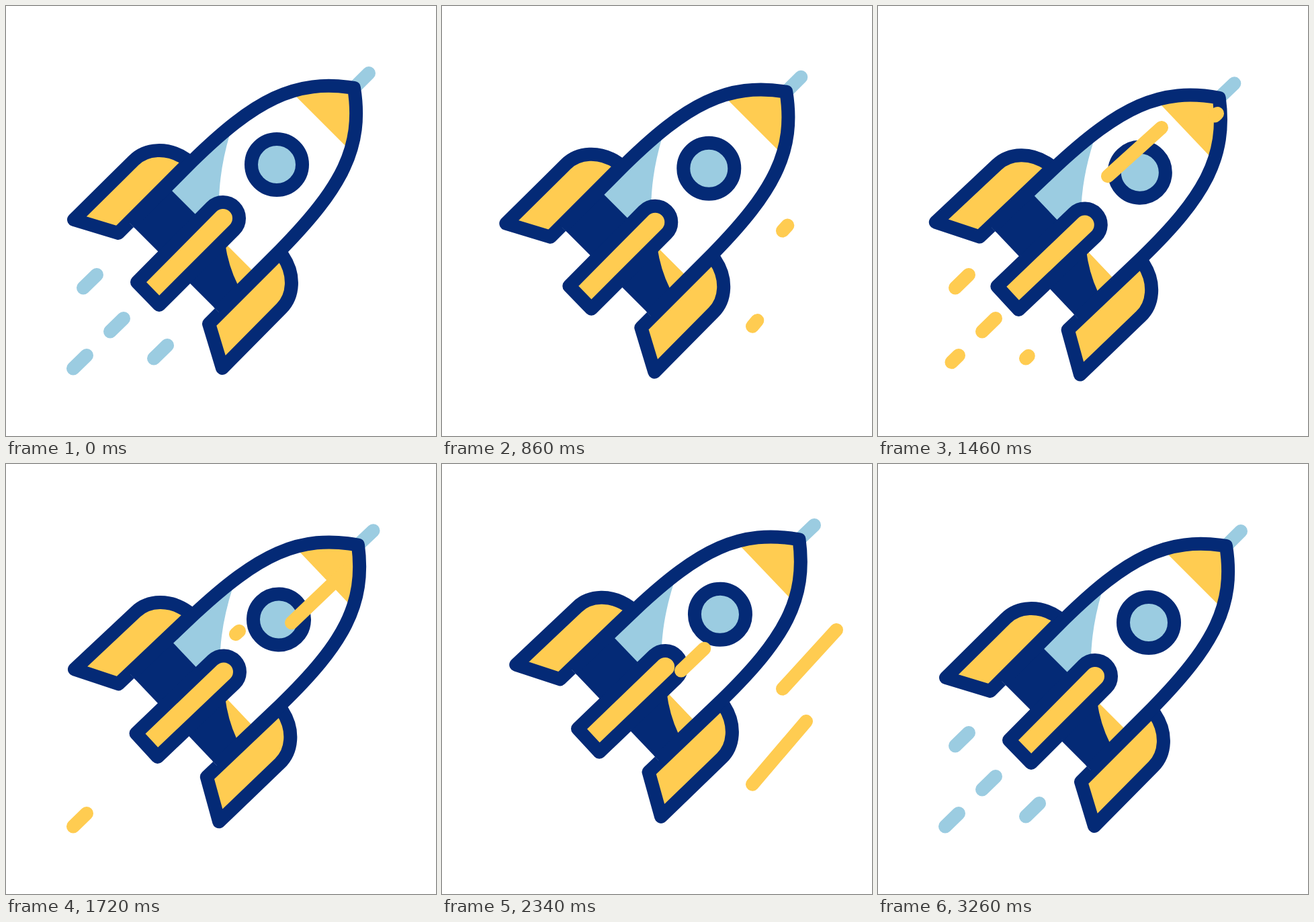
An HTML page for the animation above (3520 ms loop, 640 px wide and 640 px high).

```html
<!DOCTYPE html>
<html lang="en">
<head>
<meta charset="utf-8">
<title>Rocket</title>
<style>
  html, body { margin: 0; width: 100%; height: 100%; overflow: hidden; background: #fff; }
  svg { display: block; width: 100vw; height: 100vh; }
  .navy { fill: #042a76; }
  .gold { fill: #ffcc51; }
  .sky { fill: #9bcce1; }
  .line { stroke: #042a76; stroke-width: 20; stroke-linejoin: round; }
  .trail { stroke-width: 20; stroke-linecap: round; }
</style>
</head>
<body>
<svg viewBox="0 0 640 640">
  <g id="back"></g>
  <g id="rocket">
    <path class="trail" stroke="#9bcce1" d="M540 100L515 125"/>
    <path id="fin" class="gold line" d="M101 318L190 230C208 212 240 209 268 228L270 235L167 338Z"/>
    <use href="#fin" transform="matrix(0 -1 -1 0 640 640)"/>
    <path id="hull" fill="#fff" d="M184.5 323.5L277 231C370 140 430 108 518 122C532 210 500 270 409 363L316.5 455.5"/>
    <path class="sky" d="M333 191C310 270 310 345 345 415L228 288Z"/>
    <path class="navy" d="M240 268L372 400L316.5 455.5L184.5 323.5Z"/>
    <path class="gold" d="M326 353Q331 387 345 415L368 395Z"/>
    <path class="gold" d="M425 128L518 122L513 216Z"/>
    <use href="#hull" class="line" fill-opacity="0"/>
    <circle class="sky line" cx="403" cy="236" r="38"/>
    <path class="gold line" d="M195 411L306 299A24 24 0 0 1 340 333L228 445Z"/>
  </g>
  <g id="front"></g>
</svg>
<script>
const LOOP = 3520, START = 320, TOP = 622, BEAT = 171;
const FIRST_LOW = TOP - BEAT, LAST_LOW = TOP + 13 * BEAT;
const SKY = '#9bcce1', GOLD = '#ffcc51';
const $ = id => document.getElementById(id);
const clamp = v => Math.max(0, Math.min(1, v));
const ease = v => (1 - Math.cos(Math.PI * clamp(v))) / 2;

// A trail is drawn from its upper end, then erased from that end.
const trails = [];
function addTrail(layer, color, ends, birth, death, span) {
  const el = document.createElementNS('http://www.w3.org/2000/svg', 'path');
  el.setAttribute('class', 'trail');
  el.setAttribute('stroke', color);
  $(layer).append(el);
  trails.push({ el, ends, birth, death, span });
}

// Exhaust: blue at rest, gold puffs at a steady pace in flight
const dashes = [[135, 400], [175, 465], [120, 520], [240, 505]]
  .map(([x, y]) => [x, y, x - 20, y + 19.5]);
for (const ends of dashes) {
  addTrail('back', SKY, ends, -1000, 830, 510);
  addTrail('back', SKY, ends, 2400, 9000, 510);
}
[[3], [0, 1], [2], [], [0, 3]].forEach((puff, i) => {
  const birth = 961 + 204 * i;
  for (const n of puff) addTrail('back', GOLD, dashes[n], birth, birth + 533, 175);
});

// Streaks rushing past: upper end and beats; they fan out towards the lower right.
const streaks = [
  [587, 247, 0, 10], [542, 383, 0, 10], [422, 181, 5], [505, 160, 6],
  [436, 231, 9], [411, 154, 12], [477, 380, 13]
];
for (const [x, y, ...beats] of streaks) {
  const ends = [x, y, x - 80, y + 80 * (0.4 + (x + y) / 1200)];
  for (const beat of beats) {
    const birth = 427 + BEAT * beat;
    addTrail('front', GOLD, ends, birth, birth + 450, 175);
  }
}

function drawTrail({ el, ends: [x1, y1, x2, y2], birth, death, span }, t) {
  const head = clamp((t - birth) / span), tail = clamp((t - death + span) / span);
  const at = k => `${x1 + (x2 - x1) * k} ${y1 + (y2 - y1) * k}`;
  el.setAttribute('d', head > tail ? `M${at(tail)}L${at(head)}` : '');
}

function drawRocket(t) {
  const phase = Math.PI * (t - TOP) / BEAT;
  // The swing lingers at both ends of its path.
  let shift = Math.sin(Math.PI / 2 * Math.cos(phase));
  if (t < FIRST_LOW) shift = -ease((t - START) / (FIRST_LOW - START));
  if (t > LAST_LOW) shift = ease((t - LAST_LOW) / BEAT) - 1;
  // Tilts while falling back, straightens while climbing.
  let tilt = 1.5 * clamp(0.5 + 2.27 * Math.sin(phase)) * clamp((t - START) / 60);
  if (t > LAST_LOW + 20) tilt = 0;
  const d = 12 * shift;
  $('rocket').setAttribute('transform', `translate(${d} ${-d}) rotate(${tilt} 412 190)`);
}

function frame() {
  const t = performance.now() % LOOP;
  drawRocket(t);
  for (const trail of trails) drawTrail(trail, t);
  requestAnimationFrame(frame);
}
frame();
</script>
</body>
</html>
```
